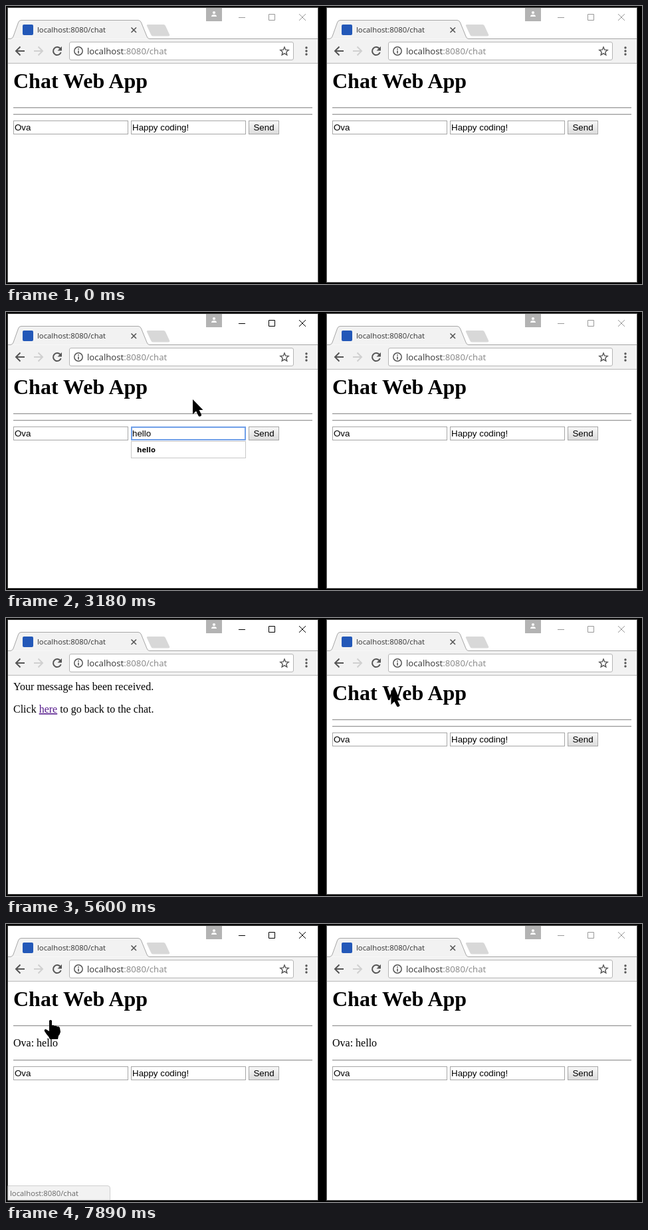
An HTML page for the animation above (8000 ms loop, 957x420 px).

```html
<!DOCTYPE html>
<html lang="en">
<head>
<meta charset="utf-8">
<title>Chat demo</title>
<style>
  html, body { margin: 0; width: 100%; height: 100%; overflow: hidden; background: #000; }
  svg { display: block; }
  .ui { font: 11.3px "Open Sans", sans-serif; fill: #333; }
  .url { font-size: 13.2px; }
  .dim { fill: #858585; }
  .bold { font-weight: bold; fill: #000; }
  .field { font: 13.333px "Liberation Sans", Arial, sans-serif; }
  .body { font: 16px "Liberation Serif", "Times New Roman", serif; }
  .title { font: bold 32px "Liberation Serif", "Times New Roman", serif; }
  .link { fill: #551a8b; text-decoration: underline; }
  .line { fill: none; stroke: #555; }
</style>
</head>
<body>
<svg id="stage" width="957" height="420" viewBox="0 0 957 420">
  <defs>
    <linearGradient id="face" x2="0" y2="1">
      <stop stop-color="#f8f8f8"/><stop offset="1" stop-color="#dcdcdc"/>
    </linearGradient>
  </defs>
  <g id="scene"></g>
</svg>
<script>
const LOOP = 8000, STEP = 77;
const USER = 'Ova', DRAFT = 'Happy coding!', REPLY = 'hello';
const SUGGESTIONS = ['hello', 'hey', 'hi', 'how are you'];
const KEY_TIMES = [2080, 2160, 2330, 2480, 2630];

// Pointer moves: start time, then [step, x, y] waypoints
const MOVES = [
  [80, [0, 250, 430], [1, 254, 396], [4, 277, 275], [7, 285, 206], [8, 286, 193]],
  [840, [1, 286, 191]],
  [1160, [0, 286, 191], [1, 270, 188], [3, 190, 180], [5, 124, 173]],
  [3030, [0, 124, 173], [3, 281, 132], [6, 350, 147], [11, 385, 181]],
  [4570, [0, 385, 181], [2, 341, 207], [4, 400, 196], [6, 479, 170], [8, 530, 150], [11, 576, 135]],
  [5430, [0, 576, 135], [2, 586, 118], [7, 553, 70]],
  [6270, [0, 553, 70], [2, 573, 70]],
  [6660, [0, 573, 70], [3, 430, 215], [5, 299, 268], [8, 150, 215], [11, 79, 156]],
  [7520, [1, 64, 147]],
  [7660, [1, 67, 145]],
];

const POINTERS = {
  arrow: '<path d="M0 0V22.5L5 17.8L8.8 25.2Q10 26.4 12 25.2Q13.6 24.2 13 23L9.6 16H15.5Z"/>',
  beam: '<path d="M-5-11H-1L0-10L1-11H5V-8H2V8H5V11H1L0 10L-1 11H-5V8H-2V-8H-5Z"/>',
  resize: '<path stroke="#fff" d="M-12 0L-5-7V-2H5V-7L12 0L5 7V2H-5V7Z"/>',
  hand: '<path d="M-2 1Q0-1 2 1V8Q4 7 6 9Q8 8 10 10Q13 9 14 12L15 18Q14 22 12 24L11 29H-1L-3 25Q-6 22-9 17Q-10 14-7 14L-2 17Z"/>',
};

const between = (t, from, to) => t >= from && t < to;
const text = (cls, x, y, content, extra = '') =>
  `<text class="${cls}" x="${x}" y="${y}" ${extra}>${content}</text>`;
const rect = (x, y, w, h, fill, extra = '') =>
  `<rect x="${x}" y="${y}" width="${w}" height="${h}" fill="${fill}" ${extra}/>`;
const line = (d, color = '#555', width = 1) =>
  `<path class="line" d="${d}" style="stroke:${color};stroke-width:${width}"/>`;

function pointerAt(t) {
  const move = MOVES.filter(m => t >= m[0]).pop();
  if (!move) return null;
  const [start, ...points] = move;
  const step = Math.floor((t - start) / STEP + .15) + 1;
  const next = points.findIndex(p => p[0] >= step);
  const b = next < 0 ? points[points.length - 1] : points[next];
  const a = points[next - 1] || b;
  const f = a === b ? 0 : (step - a[0]) / (b[0] - a[0]);
  const x = a[1] + (b[1] - a[1]) * f, y = a[2] + (b[2] - a[2]) * f;
  let kind = 'arrow';
  if (t >= 7660) kind = 'hand';
  else if (t < 3030 && y < 194) kind = 'beam';
  else if (Math.abs(x - 478) < 12 && y > 160 && y < 180) kind = 'resize';
  return { x, y, kind };
}

function chrome({ active, loading, reloadPressed }) {
  const ink = active ? '#000' : '#999';
  return rect(2.5, 2.5, 467, 415, '#fff', `stroke="${active ? '#444' : '#666'}"`)
    + rect(3, 50, 466, 36, '#f2f2f2')
    + line('M3 86.5H469', '#b8b8b8')
    + '<path d="M3 49.5H7Q10 49 11 46L18.500 25Q19.500 21.500 23 21.500H199Q202 21.500 203.500 25L212 46Q213 49.500 216 49.500H469" fill="#f2f2f2" stroke="#a6a6a6"/>'
    + '<path d="M214 28H237Q239 28 240 30L246 43Q247 45.500 244 45.500H221Q219 45.500 218 43L212 30Q211 28 214 28Z" fill="#d8d8d8"/>'
    + (loading ? '' : rect(25, 28, 16, 16, '#2358b8', 'rx="2"'))
    + text('ui', 47, 40, 'localhost:8080/chat')
    + line('M188.500 32.500L196 40M196 32.500L188.500 40', '#555', 1.6)
    + rect(301, 3, 24, 20, '#b3b3b3')
    + '<path d="M309 16Q309 13 313 13T317 16Z" fill="#fff"/><circle cx="313" cy="10" r="2.1" fill="#fff"/>'
    + line('M350 17.500H360M395.500 12.500H404.500V21.500H395.500ZM441 12L451 22M451 12L441 22', ink)
    + line('M28 68H15.500M21.500 61.500L15 68L21.500 74.500', '#555', 2)
    + line('M42 68H54.500M48.500 61.500L55 68L48.500 74.500', '#d0d0d0', 2)
    + (reloadPressed ? '<circle cx="77" cy="68" r="11" fill="#c8c8c8"/>' : '')
    + line('M81.500 64A6 6 0 1 0 82.700 70', '#555', 2)
    + '<path d="M84 61V67.500H77.500Z" fill="#555"/>'
    + rect(95.5, 54.5, 337, 27, '#fff', 'rx="2.5" stroke="#b5b5b5"')
    + '<circle class="line" cx="109" cy="68" r="6.2" stroke-width="1.5"/>'
    + line('M109 64.300V66M109 67.200V71.800', '#555', 1.6)
    + text('ui url', 122, 73, 'localhost<tspan class="dim">:8080/chat</tspan>')
    + line('M419 62L420.700 66.200L425.200 66.600L421.800 69.500L422.800 74L419 71.600L415.200 74L416.200 69.500L412.800 66.600L417.300 66.200Z', '#555', 1.4)
    + [63, 68, 73].map(y => `<circle cx="452" cy="${y}" r="1.7" fill="#555"/>`).join('');
}

const rule = y => rect(11, y, 450, 1, '#959595') + rect(11, y + 1, 450, 1, '#e6e6e6');

function chatPage({ posted, message = DRAFT, focused, caret, selectFrom, menu = [], hover }) {
  const dy = posted ? 42 : 0;
  let form = rect(11.5, 173.5, 172, 20, '#fff', 'stroke="#a6a6a6"')
    + text('field', 13, 188, USER)
    + (focused
      ? rect(189, 174, 171, 19, '#fff', 'stroke="#6f9fe8" stroke-width="2"')
      : rect(188.5, 173.5, 172, 20, '#fff', 'stroke="#a6a6a6"'))
    + text('field', 190, 188, message)
    + rect(365.5, 173.5, 45, 20, 'url(#face)', `stroke="${hover ? '#777' : '#a6a6a6'}"`)
    + text('field', 388, 188, 'Send', 'text-anchor="middle"');
  if (caret) form += rect(274, 176, 1, 15, '#000');
  if (selectFrom) {
    form += `<svg x="${selectFrom}" y="176" width="${275 - selectFrom}" height="15">`
      + rect(0, 0, 85, 15, '#3390ff') + text('field', 190 - selectFrom, 12, message, 'fill="#fff"') + '</svg>';
  }
  if (menu.length) {
    form += rect(188.5, 195.5, 172, 24 * menu.length + 1, '#fff', 'stroke="#c8c8c8"')
      + menu.map((word, i) => text('ui bold', 197, 212 + 24 * i, word)).join('');
  }
  return text('title', 11, 124, 'Chat Web App') + rule(153) + rule(163 + dy)
    + (posted ? text('body', 11, 185, `${USER}: ${REPLY}`) : '')
    + `<g transform="translate(0 ${dy})">${form}</g>`;
}

const receiptPage = () => text('body', 11, 109, 'Your message has been received.')
  + text('body', 11, 143, 'Click <tspan class="link">here</tspan> to go back to the chat.');

function leftWindow(t, pointer) {
  const typed = REPLY.slice(0, KEY_TIMES.filter(k => t >= k).length);
  const bar = chrome({ active: between(t, 1010, 6050) || t >= 7810, loading: between(t, 3960, 4040) });
  if (t >= 7890) return bar + chatPage({ posted: true });
  if (t >= 4040) return bar + receiptPage();
  return bar + chatPage({
    message: typed || DRAFT,
    focused: t >= 1010,
    caret: between(t, 1010, 1160),
    selectFrom: between(t, 1160, 2080) && Math.max(190, pointer.x),
    menu: typed && t < 3880 ? SUGGESTIONS.filter(word => word.startsWith(typed)) : [],
    hover: pointer && pointer.x > 365 && pointer.y > 173 && t > 3030,
  });
}

const rightWindow = t => chrome({
  active: between(t, 6050, 7810),
  loading: between(t, 6120, 6350),
  reloadPressed: between(t, 6050, 6270),
}) + chatPage({ posted: t >= 6200 });

const statusBar = () =>
  '<path d="M3 395.500H153Q156.500 395.500 156.500 399V417H3Z" fill="#f2f2f2" stroke="#cfcfcf"/>'
  + text('ui', 6, 411, 'localhost:8080/chat', 'style="fill:#666"');

function render(t) {
  const pointer = pointerAt(t);
  return leftWindow(t, pointer)
    + `<g transform="translate(480)">${rightWindow(t)}</g>`
    + (t >= 7810 ? statusBar() : '')
    + (pointer ? `<g transform="translate(${pointer.x} ${pointer.y})">${POINTERS[pointer.kind]}</g>` : '');
}

const scene = document.getElementById('scene');
let shown = '';
function tick() {
  const markup = render(performance.now() % LOOP);
  if (markup !== shown) scene.innerHTML = shown = markup;
  requestAnimationFrame(tick);
}
tick();
</script>
</body>
</html>
```
